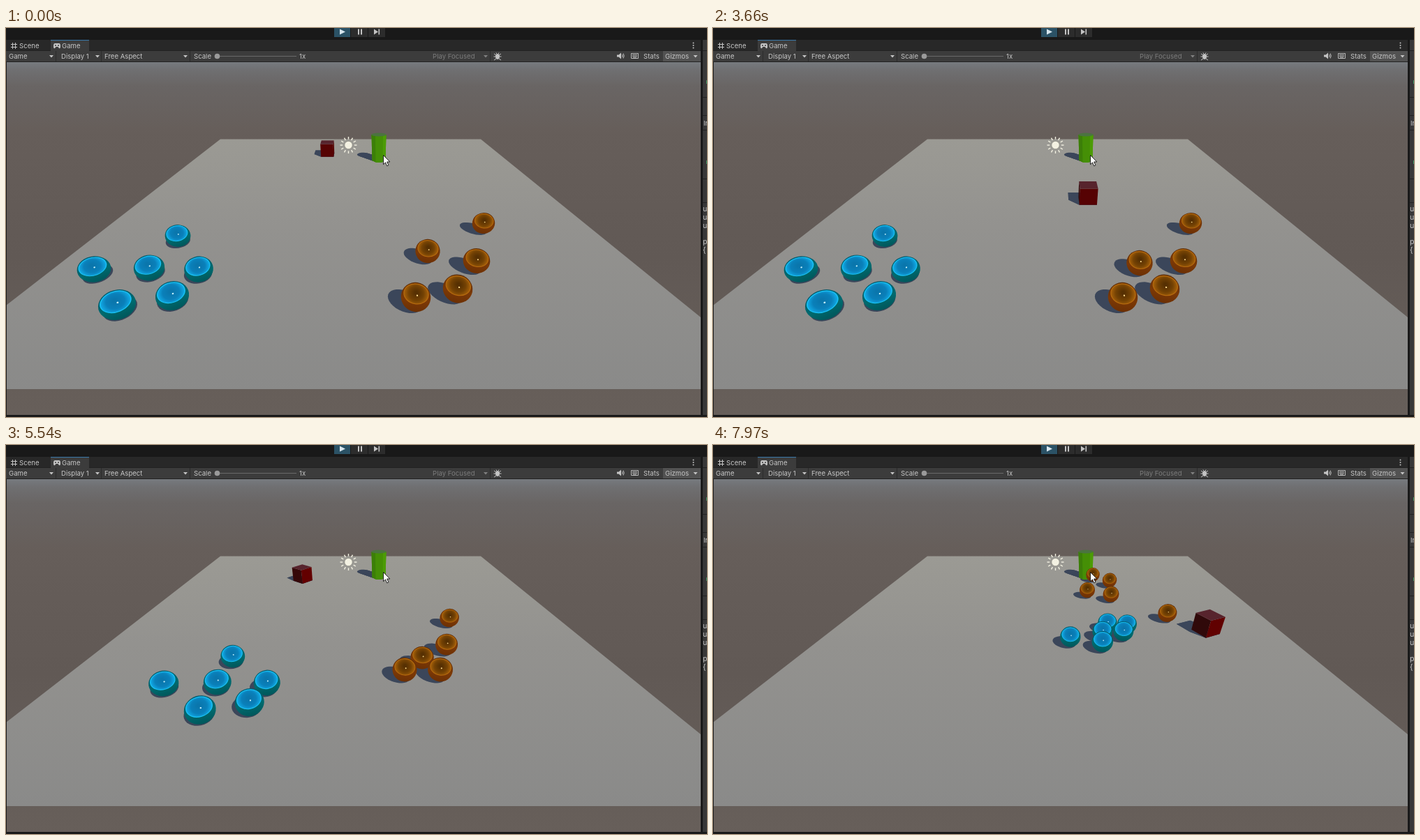
These frames come from a looping animation (1004 px wide and 558 px high, 8000 ms). An HTML page with a canvas:

```html
<!DOCTYPE html>
<html lang="en">
<head>
<meta charset="utf-8">
<title>Physics scene</title>
<style>
  html, body { margin: 0; width: 100%; height: 100%; overflow: hidden; background: #191919; }
  canvas, svg { position: absolute; left: 0; top: 0; width: 1004px; height: 558px; }
  text { font: 9.6px Inter, Roboto, sans-serif; fill: #c6c6c6; }
  .code { font-size: 10.5px; }
  .dim { fill: #7c7c7c; }
</style>
</head>
<body>
<canvas id="scene" width="1004" height="558"></canvas>
<svg viewBox="0 0 1004 558">
  <defs>
    <path id="caret" d="M-3-1.5h6L0 2z"/>
    <path id="ray" d="M0-8.3V-12" stroke="#f3f1e2" stroke-width="1.4"/>
  </defs>

  <!-- editor chrome -->
  <path fill="#191919" d="M0 0H1004V17H0z"/>
  <path fill="#282828" d="M0 17H995V33H0z"/>
  <path fill="#3c3c3c" d="M64 18H119V33H64zM0 33H995V48H0z"/>
  <path fill="#3a78a8" d="M64 17H119V18H64z"/>
  <path fill="#222" d="M0 32H64V33H0zM119 32H995V33H119zM0 48H995V49H0z"/>
  <path fill="#2b5266" d="M470 0H493V13H470z"/>
  <path fill="#2c2c2c" d="M494 0H518V13H494zM519 0H543V13H519z"/>
  <path fill="#d8e6ee" d="M478 1.5L486 5.5 478 9.5z"/>
  <path fill="#c4c4c4" d="M504 1.5h2v8h-2zM508 1.5h2v8h-2zM527 1.5L533 5.5 527 9.5zM533.5 1.5h1.6v8h-1.6z"/>
  <path stroke="#c4c4c4" fill="none" d="M9.5 21v9M13.5 21v9M7 23.5h9M7 27.5h9"/>
  <path fill="#c4c4c4" d="M70 22h6q2 0 2 4t-2 3l-1.500-2h-3l-1.500 2q-2 1-2-3t2-4z"/>
  <circle cx="71" cy="25" r="1" fill="#3c3c3c"/><circle cx="75" cy="25" r="1" fill="#3c3c3c"/>
  <text x="19" y="29">Scene</text>
  <text x="80" y="29">Game</text>
  <g fill="#c4c4c4"><circle cx="984.500" cy="21.500" r="1"/><circle cx="984.500" cy="25" r="1"/><circle cx="984.500" cy="28.500" r="1"/></g>

  <path fill="#525252" d="M941 33H995V48H941z"/>
  <path fill="#2b2b2b" d="M71 33h1v15h-1zM136 33h1v15h-1zM263 33h1v15h-1zM693 33h1v15h-1z"/>
  <text x="4" y="44">Game</text>
  <text x="79" y="44">Display 1</text>
  <text x="141" y="44">Free Aspect</text>
  <text x="269" y="44">Scale</text>
  <text x="420" y="44">1x</text>
  <text x="611" y="44" class="dim">Play Focused</text>
  <text x="913" y="44">Stats</text>
  <text x="944" y="44">Gizmos</text>
  <g fill="#c4c4c4">
    <use href="#caret" x="65" y="40.500"/><use href="#caret" x="131" y="40.500"/><use href="#caret" x="257" y="40.500"/>
    <use href="#caret" x="687" y="40.500" opacity=".5"/><use href="#caret" x="987.500" y="40.500"/>
  </g>
  <path stroke="#6a6a6a" d="M303 40.500H416"/>
  <circle cx="302.500" cy="40.500" r="3.800" fill="#9a9a9a"/>
  <g stroke="#c4c4c4" fill="none">
    <ellipse cx="704" cy="41" rx="2.500" ry="3.500" fill="#c4c4c4"/>
    <path d="M699 37l3 2M709 37l-3 2M698.500 41h11M699 46l3-2M709 46l-3-2M702 35.500l1 2M706 35.500l-1 2"/>
    <path fill="#c4c4c4" stroke="none" d="M875 38.500h2.500l3.500-3v9l-3.500-3H875z"/>
    <path d="M882.500 38q1.500 2 0 4M884 36.500q2.500 3.500 0 7"/>
    <path d="M895.500 36.500h10v7h-10zM897 38.500h7M897 40.500h7M898 42.300h5" stroke-width=".9"/>
  </g>

  <!-- clipped side panel -->
  <path fill="#191919" d="M995 17H1004V558H995z"/>
  <path fill="#383838" d="M998 17H1004V558H998z"/>
  <path fill="#222" d="M998 32h6v1h-6zM998 99h6v1h-6zM998 125h6v1h-6zM998 146h6v1h-6zM998 216h6v1h-6zM998 250h6v1h-6z"/>
  <path fill="#3f9a63" d="M1003 75h1v5h-1zM1003 190h1v5h-1z"/>
  <text x="999" y="140">Ir</text>
  <g class="code">
    <text class="code" x="998" y="263">u</text><text class="code" x="998" y="275">u</text><text class="code" x="998" y="287">u</text>
    <text class="code" x="998" y="310">p</text><text class="code" x="998" y="322">{</text>
  </g>
  <path fill="#191919" d="M0 555H1004V558H0zM0 49H1V558H0z"/>

  <!-- light icon and pointer -->
  <g transform="translate(490.500 168)">
    <circle r="5.600" fill="#f3f1e2" stroke="#8b8a80" stroke-width=".6"/>
    <g id="rays"></g>
  </g>
  <path d="M540.500 182.500v13.200l3-2.800 2.200 5 2.200-1-2.200-4.900h4.100z" fill="#fff" stroke="#111" stroke-width=".9"/>
</svg>
<script>
const ctx = document.getElementById('scene').getContext('2d');
document.getElementById('rays').innerHTML =
  Array.from({ length: 12 }, (_, i) => `<use href="#ray" transform="rotate(${i * 30})"/>`).join('');

const LOOP = 8000, HOLD = 260, STEP = 1000 / 14.4;

// Pinhole camera above the floor, pitched down
const FOCAL = 439, CX = 497.5, CY = 302, HEIGHT = 8;
const SIN = Math.sin(0.585), COS = Math.cos(0.585);
const PLUMB_Y = CY + FOCAL * COS / SIN;
// Shadow displacement per unit of height
const SX = -0.6, SZ = 0.65, SLEN = Math.hypot(SX, SZ);

function project(x, y, z) {
  const h = HEIGHT - y, d = z * COS + h * SIN;
  return [CX + FOCAL * x / d, CY - FOCAL * (z * SIN - h * COS) / d, d];
}

function unproject(px, py, y = 0.5) {
  const u = (CY - py) / FOCAL, h = HEIGHT - y;
  const z = h * (COS + u * SIN) / (SIN - u * COS);
  return { x: (px - CX) * (z * COS + h * SIN) / FOCAL, z };
}

// Tracks hold screen centres at these times
const ROLL = [4240, 4560, 5540, 6850, 7970];
const track = (times, ...points) => times.map((t, i) => [t, ...points[i]]);

const blue = [
  [[246, 298], [250, 298], [325, 303], [481, 293], [565, 255]],
  [[126, 346], [131, 346], [226, 342], [406, 318], [512, 275]],
  [[205, 344], [210, 344], [303, 340], [475, 311], [558, 267]],
  [[276, 346], [281, 346], [374, 341], [534, 305], [593, 257]],
  [[159, 397], [165, 396], [278, 380], [463, 332], [558, 282]],
  [[238, 384], [244, 383], [349, 369], [520, 323], [588, 267]]
].map(p => track(ROLL, ...p));

const orange = [
  [[684, 280], [681, 279], [635, 248], [569, 205], [544, 186]],
  [[674, 334], [672, 331], [631, 286], [577, 226], [568, 194]],
  [[587, 386], [586, 383], [571, 322], [549, 248], [536, 208]],
  [[647, 374], [646, 370], [622, 322], [592, 252], [651, 241]]
].map(p => track(ROLL, ...p));
orange.push(track([2650, 3100, 3660, 4560, 5540, 6850, 7970],
  [604, 320], [609, 332], [611, 337], [616, 346], [596, 305], [575, 242], [570, 214]));

// Third value: turn in degrees
const cube = [
  [200, 460.5, 173, 0], [1020, 510, 177, 0], [1500, 570, 194, 0], [1860, 603, 215, 0],
  [2270, 611, 226, 0], [2690, 607, 268, 0], [2850, 601, 283, 0], [3520, 546, 251, 0],
  [3660, 537, 237, 0], [4180, 532, 191, 5], [4560, 495.5, 178, 38], [5100, 436, 180, 46],
  [5540, 424.5, 185, 50], [6200, 475, 206, 60], [6850, 560, 237, 70], [7690, 681, 252, 104],
  [7970, 709, 256, 115]
];

// Smooth monotone interpolation through a track
function sample(keys, t) {
  const last = keys.length - 1;
  if (t <= keys[0][0]) return keys[0].slice(1);
  if (t >= keys[last][0]) return keys[last].slice(1);
  const i = keys.findIndex(k => k[0] > t) - 1;
  const a = keys[i], b = keys[i + 1], span = b[0] - a[0], u = (t - a[0]) / span;
  const slope = (n, c) => (keys[n + 1][c] - keys[n][c]) / (keys[n + 1][0] - keys[n][0]);
  const tangent = (n, c) => {
    if (n === 0) return 0;
    if (n === last) return slope(n - 1, c);
    const p = slope(n - 1, c), q = slope(n, c);
    return p * q > 0 ? 2 * p * q / (p + q) : 0;
  };
  return a.slice(1).map((v, j) => {
    const c = j + 1, w = u * u * (3 - 2 * u);
    return v + (b[c] - v) * w + span * u * (1 - u) * ((1 - u) * tangent(i, c) - u * tangent(i + 1, c));
  });
}

function poly(points, fill) {
  ctx.beginPath();
  points.forEach(p => ctx.lineTo(p[0], p[1]));
  ctx.closePath();
  ctx.fillStyle = fill;
  ctx.fill();
}

function gradient(y0, y1, ...stops) {
  const g = ctx.createLinearGradient(0, y0, 0, y1);
  stops.forEach(([at, color]) => g.addColorStop(at, color));
  return g;
}

const SHADOW = '#3b465a';

// Ellipse on the floor, long axis along the shadow
function floorShadow(x, z, long, short) {
  const ux = SX / SLEN, uz = SZ / SLEN, points = [];
  for (let a = 0; a < 6.28; a += 0.2) {
    const p = long * Math.cos(a), q = short * Math.sin(a);
    points.push(project(x + ux * p - uz * q, 0, z + uz * p + ux * q));
  }
  poly(points, SHADOW);
}

const skins = {
  blue: { base: ['#04586c', '#006a6e', '#00575b'], bowl: ['#0a76ac', '#0a80ba', '#12aeea'], rim: '#18c0f4', dot: '#c8f4ff' },
  orange: { base: ['#5c2c06', '#7c3906', '#6c3004'], bowl: ['#563002', '#744204', '#a8620a'], rim: '#b4690e', dot: '#ffdc90' }
};

function makeBall(keys, skin, t) {
  const { x, z } = unproject(...sample(keys, t));
  const { base, bowl, rim, dot } = skins[skin];
  return {
    z,
    shadow: () => floorShadow(x + SX / 2, z + SZ / 2, 0.5 * Math.hypot(1, SLEN), 0.5),
    draw() {
      const [px, py, d] = project(x, 0.5, z);
      const r = FOCAL * 0.5 / d, off = Math.hypot(px - CX, py - CY) / FOCAL;
      const phi = Math.atan2(py - CY, px - CX);
      ctx.save();
      ctx.translate(px, py);
      ctx.rotate(phi);
      ctx.scale(r * Math.hypot(1, off), r);
      ctx.rotate(-phi + 0.8 * Math.atan2(px - CX, PLUMB_Y - py));
      ctx.beginPath();
      ctx.arc(0, 0, 1, 0, 7);
      ctx.fillStyle = gradient(-1, 1, [0, base[0]], [0.6, base[1]], [1, base[2]]);
      ctx.fill();
      ctx.beginPath();
      ctx.ellipse(0, -0.22, 0.83, 0.68, 0, 0, 7);
      const g = ctx.createRadialGradient(0, -0.3, 0.1, 0, -0.22, 0.83);
      bowl.forEach((color, i) => g.addColorStop([0, 0.55, 1][i], color));
      ctx.fillStyle = g;
      ctx.fill();
      ctx.lineWidth = 0.06;
      ctx.strokeStyle = rim;
      ctx.stroke();
      ctx.beginPath();
      ctx.arc(0.08, -0.12, 0.055, 0, 7);
      ctx.fillStyle = dot;
      ctx.fill();
      ctx.restore();
    }
  };
}

function makeCube(t) {
  const [px, py, deg] = sample(cube, t);
  const { x, z } = unproject(px, py);
  const turn = deg * Math.PI / 180, c = Math.cos(turn), s = Math.sin(turn);
  const base = [[-.5, -.5], [.5, -.5], [.5, .5], [-.5, .5]]
    .map(([a, b]) => [x + a * c - b * s, z + a * s + b * c]);
  const lift = y => base.map(([a, b]) => project(a, y, b));
  const sides = (low, high) => low.map((p, i) => {
    const j = (i + 1) % 4;
    return [p, low[j], high[j], high[i]];
  });
  return {
    z,
    shadow() {
      const low = lift(0), far = base.map(([a, b]) => project(a + SX, 0, b + SZ));
      [low, far, ...sides(low, far)].forEach(q => poly(q, SHADOW));
    },
    draw() {
      const low = lift(0), high = lift(1);
      sides(low, high).forEach((q, i) => {
        const [a, b, e] = q;
        if ((b[0] - a[0]) * (e[1] - a[1]) - (b[1] - a[1]) * (e[0] - a[0]) > 0) return;
        const n = turn + (i - 1) * Math.PI / 2;
        const light = Math.max(0, 0.6 * Math.cos(n) - 0.65 * Math.sin(n));
        poly(q, `rgb(${48 + 58 * light},${9 - 10 * light},${10 - 11 * light})`);
      });
      poly(high, '#57242d');
    }
  };
}

const post = unproject(533.5, 189, 0);
const pillar = {
  z: post.z,
  shadow() {
    for (let h = 0; h <= 2; h += 0.1) floorShadow(post.x + SX * h, post.z + SZ * h, 0.5, 0.5);
  },
  draw() {
    poly([[523.5, 153], [544.5, 153], [543.5, 190], [538, 193], [530, 193], [524.5, 190]], '#458f06');
    poly([[523.5, 153], [529, 154], [529.5, 192.5], [524.5, 190]], '#3c7f08');
    poly([[540, 154], [544.5, 153], [543.5, 190], [539.5, 192]], '#4c9c06');
    ctx.beginPath();
    ctx.ellipse(534, 153, 10.5, 2.6, 0, 0, 7);
    ctx.fillStyle = '#4b7440';
    ctx.fill();
  }
};

const sky = gradient(48, 556, [0, '#777b80'], [0.025, '#6f6f71'], [0.07, '#696564'], [0.2, '#665e5a'], [0.55, '#615955'], [1, '#675f5a']);
const floor = gradient(159, 518, [0, '#9b9a94'], [0.35, '#93928f'], [1, '#8a8a89']);

function render(t) {
  ctx.fillStyle = sky;
  ctx.fillRect(0, 48, 1004, 510);
  poly([[307, 159.5], [680, 159.5], [995, 415], [995, 518], [0, 518], [0, 398]], floor);
  const parts = [
    pillar, makeCube(t),
    ...blue.map(k => makeBall(k, 'blue', t)),
    ...orange.map(k => makeBall(k, 'orange', t))
  ].sort((a, b) => b.z - a.z);
  parts.forEach(p => p.shadow());
  parts.forEach(p => p.draw());
}

function tick(now) {
  const t = now % LOOP;
  const n = Math.floor((t - HOLD + 5) / STEP);
  render(n < 0 ? 0 : HOLD + n * STEP);
  requestAnimationFrame(tick);
}
tick(performance.now());
</script>
</body>
</html>
```
